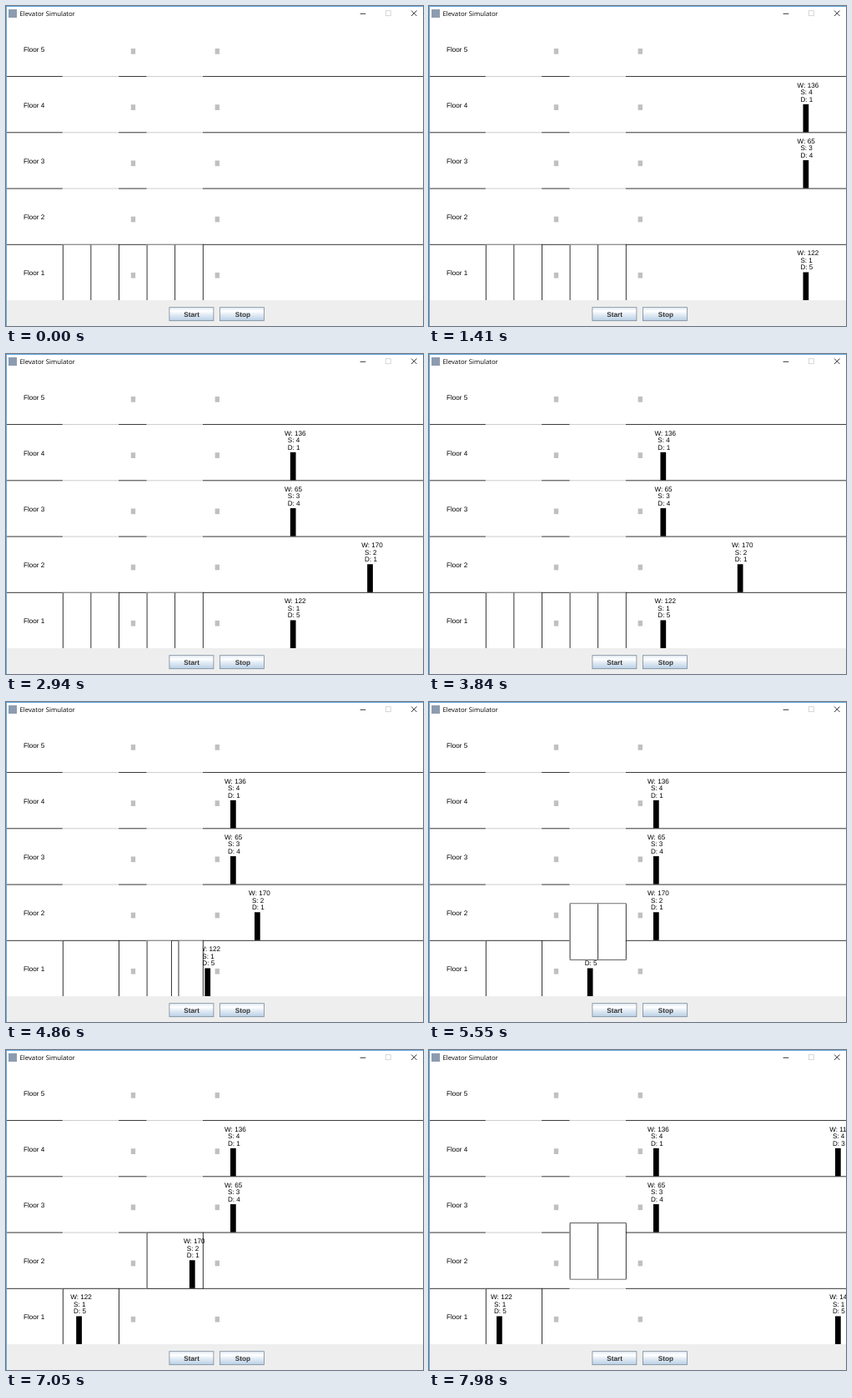
Recreate the animation shown at these times as an HTML page with a canvas. Size 500 px wide and 384 px high, loop 8 s.

```html
<!DOCTYPE html>
<html lang="en">
<head>
<meta charset="utf-8">
<title>Elevator Simulator</title>
<style>
html, body { margin: 0; width: 100%; height: 100%; overflow: hidden; background: #fff; }
canvas { display: block; width: 500px; height: 384px; }
</style>
</head>
<body>
<canvas id="stage" width="500" height="384"></canvas>
<script>
const ctx = document.getElementById('stage').getContext('2d');
ctx.textRendering = 'geometricPrecision';
const LOOP = 8000, STEP = 30;
const SPEED = 0.0704;              // px per ms for people, doors and cars
const FLOOR_H = 67.2, HALF = 33.6; // floor height, half a car
const SHAFTS = [67.87, 168.67];
const LOBBY = 269;
const LINE = 0.8;
const INK = '#000', GREY = '#c0c0c0';
const SANS = '"Liberation Sans", Arial, sans-serif';

// arrive: reaches the lobby; board: starts walking to the car; gone: hidden by doors
const people = [
  { w: 136, floor: 4, d: 1, arrive: 3960 },
  { w: 65, floor: 3, d: 4, arrive: 3960 },
  { w: 122, floor: 1, d: 5, arrive: 3960, board: 4425, stop: 81 },
  { w: 170, floor: 2, d: 1, arrive: 5272, board: 6353, stop: 199, gone: 7820 },
  { w: 118, floor: 4, d: 3, arrive: 11077 },
  { w: 145, floor: 1, d: 5, arrive: 11077 }
];

const clamp = (v, lo, hi) => Math.min(hi, Math.max(lo, v));
const moved = (t, start, dist) => clamp((t - start) * SPEED, 0, dist);
const floorTop = n => 285.85 - (n - 1) * FLOOR_H;

function rect(x, y, w, h, color) {
  ctx.fillStyle = color;
  ctx.fillRect(x, y, w, h);
}

function text(s, x, y, font = '8.15px ' + SANS, color = '#000') {
  ctx.font = font;
  ctx.fillStyle = color;
  ctx.fillText(s, x, y);
}

function cars(t) {
  const open = moved(t, 3967, HALF);
  return [
    { x: SHAFTS[0], y: floorTop(1), gap: open },
    {
      x: SHAFTS[1],
      y: floorTop(1) - moved(t, 4921, FLOOR_H) - moved(t, 7820, FLOOR_H),
      gap: open - moved(t, 4444, HALF) + moved(t, 5876, HALF) - moved(t, 7343, HALF)
    }
  ];
}

function drawFloors() {
  for (let n = 1; n <= 5; n++) {
    const y = floorTop(n);
    if (n < 5) {
      rect(0, y, 500, LINE, INK);
      for (const x of SHAFTS) {
        rect(x, y - 1, 2 * HALF, 3, '#fff');
        rect(x, y, 2 * HALF, LINE, GREY);
      }
    }
    text('Floor ' + n, 21, y + 37.6);
    for (const x of [149.8, 250.6]) rect(x, y + 34, 5.4, 6.7, GREY);
  }
}

function drawCar({ x, y }) {
  rect(x, y, 2 * HALF, FLOOR_H, '#fff');
  rect(x, y, 2 * HALF + LINE, LINE, INK);
  rect(x, y + FLOOR_H, 2 * HALF + LINE, LINE, INK);
}

function drawDoors({ x, y, gap }) {
  const right = x + 2 * HALF, a = x + HALF - gap, b = x + HALF + gap;
  const top = y + LINE, h = FLOOR_H - LINE;
  const bars = [x, right];
  if (gap < HALF - 0.2) {
    rect(x, top, a - x, h, '#fff');
    rect(b, top, right - b, h, '#fff');
    bars.push(a);
    if (gap > 0.2) bars.push(b);
  }
  for (const bar of bars) rect(bar, top, LINE, h, INK);
}

function drawPerson(p, t) {
  if (t >= p.gone) return;
  const x = t > p.board
    ? Math.max(p.stop, LOBBY - (t - p.board) * SPEED)
    : LOBBY + Math.max(0, (p.arrive - t) * SPEED);
  if (x > 508) return;
  const y = floorTop(p.floor);
  text('W: ' + p.w, x - 6.9, y + 13.3);
  text('S: ' + p.floor, x - 3.1, y + 22);
  text('D: ' + p.d, x - 3.1, y + 30.6);
  rect(x, y + 33.6, 6.72, HALF, '#000');
}

function drawButton(label, x, textX, pressed) {
  const g = ctx.createLinearGradient(0, 361, 0, 378);
  [[0, '#dde8f3'], [0.3, '#fff'], [0.6, '#dde8f3'], [1, '#b8cfe5']]
    .forEach(([at, color]) => g.addColorStop(at, color));
  rect(x, 361.3, 53.8, 16.8, '#7a8a99');
  rect(x + LINE, 361.3 + LINE, 53.8 - 2 * LINE, 16.8 - 2 * LINE, pressed ? '#b8cfe5' : g);
  text(label, textX, 373, 'bold 8.2px ' + SANS, '#333');
}

function drawWindow(t) {
  rect(0, 353, 500, 31, '#eee');
  drawButton('Start', 195.5, 213.3, t >= 420 && t < 510);
  drawButton('Stop', 256, 274.8, false);

  rect(0, 0, 500, 1, '#5fa8dc');
  rect(0, 0, 1, 384, '#5fa8dc');
  rect(3, 4, 10, 10, '#8c9bb0');
  text('Elevator Simulator', 16.5, 12, '7.75px "Open Sans", "Noto Sans", sans-serif');

  rect(424.6, 8.8, 6.7, LINE, '#000');
  ctx.lineWidth = LINE;
  ctx.strokeStyle = '#ccc';
  ctx.strokeRect(455.3, 5.7, 6, 6);
  ctx.strokeStyle = '#000';
  ctx.beginPath();
  ctx.moveTo(486, 5.5); ctx.lineTo(492.5, 12);
  ctx.moveTo(492.5, 5.5); ctx.lineTo(486, 12);
  ctx.stroke();
}

function draw(now) {
  const t = Math.floor((now % LOOP) / STEP) * STEP;
  const lifts = cars(t);
  rect(0, 0, 500, 384, '#fff');
  drawFloors();
  lifts.forEach(drawCar);
  people.forEach(p => drawPerson(p, t));
  lifts.forEach(drawDoors);
  drawWindow(t);
}

const began = performance.now();
function tick() {
  draw(performance.now() - began);
  requestAnimationFrame(tick);
}
tick();
</script>
</body>
</html>
```
